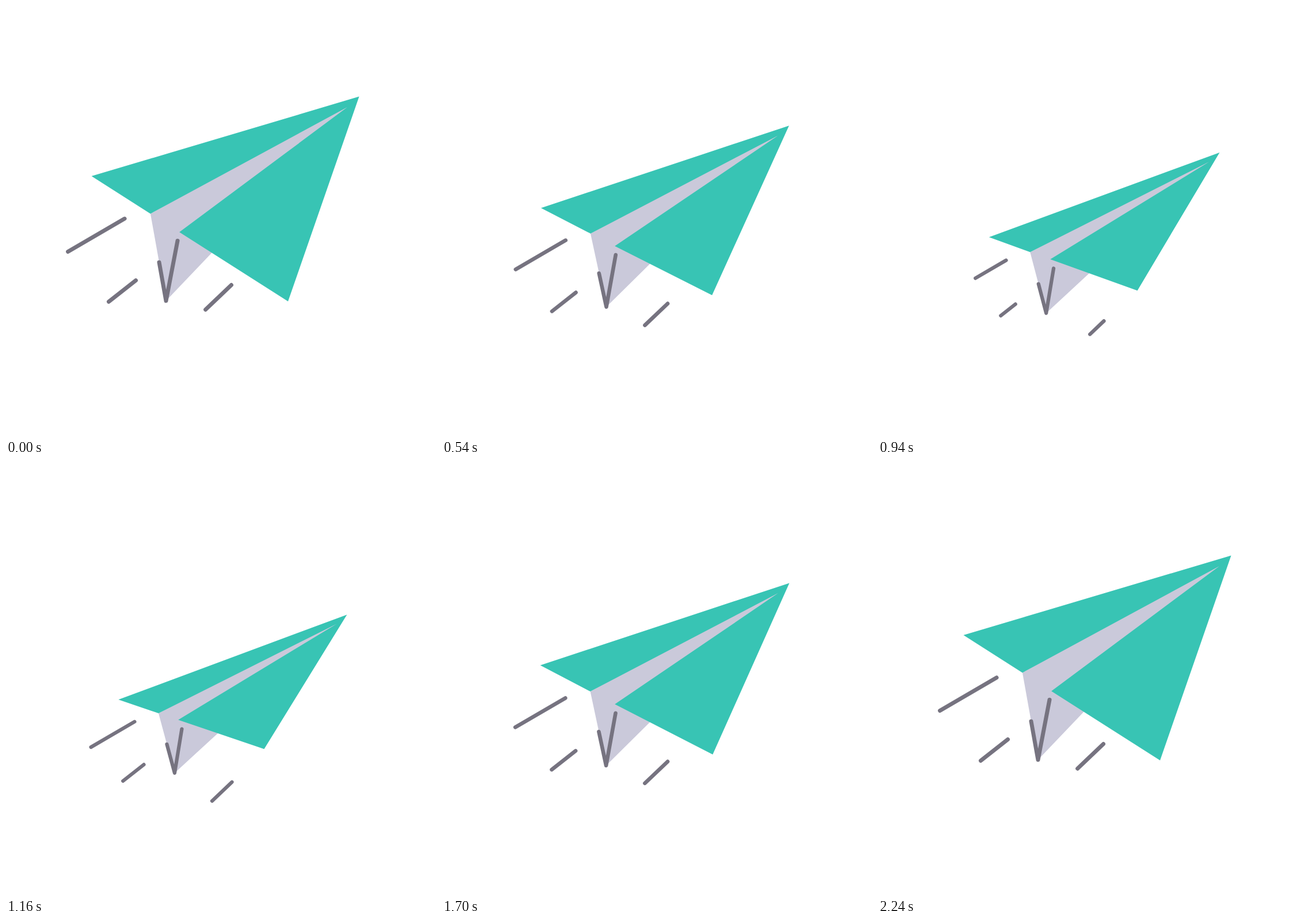
Write an HTML page that moves like this. It is 747x750 px and loops after 2260 ms.

```html
<!DOCTYPE html>
<html lang="en">
<head>
<meta charset="utf-8">
<title>Paper plane</title>
<style>
  html, body { margin: 0; width: 100%; height: 100%; overflow: hidden; background: #fff; }
  svg { display: block; width: 100%; height: 100%; }
</style>
</head>
<body>
<svg viewBox="0 0 747 750">
  <g id="plane">
    <polygon id="keel" fill="#cac9da"/>
    <polygon id="wings" fill="#38c4b4"/>
    <path id="strokes" fill="none" stroke="#767380" stroke-linecap="round" stroke-linejoin="round"/>
  </g>
</svg>
<script>
const LOOP = 2260, STEP = 20, HALF = 1120, PULSE = 280, SHORTEST = 0.415;

const el = id => document.getElementById(id);
const mix = (a, b, k) => a + (b - a) * k;
const between = (a, b, k) => [mix(a[0], b[0], k), mix(a[1], b[1], k)];
const polar = ([x, y], len, deg) => {
  const a = deg * Math.PI / 180;
  return [x + len * Math.cos(a), y + len * Math.sin(a)];
};
const ease = s => s * s * (3 - 2 * s);
const clamp = s => Math.min(1, Math.max(0, s));

// Crease, notch and keel all meet the straight rear edge at a share of its length.
function plane({ tip, left, right, foot, top, shares, bare, size }) {
  const [crease, notch, vent] = shares.map(k => between(left, right, k));
  const slit = polar(tip, 27.6 * size, 138);
  return {
    wings: [tip, left, crease, slit, notch, right],
    keel: [tip, crease, foot, vent],
    fold: [between(crease, foot, bare), foot, top]
  };
}

const raised = plane({
  tip: [613.5, 157.5], left: [148.5, 296], right: [490, 514],
  foot: [278, 513], top: [298, 408.5],
  shares: [0.3, 0.447, 0.612], bare: 0.558, size: 1
});
const lowered = plane({
  tip: [592.2, 260.8], left: [195.5, 408.7], right: [448.3, 494.3],
  foot: [293, 536], top: [305.5, 459.5],
  shares: [0.275, 0.41, 0.682], bare: 0.518, size: 0.87
});

const trails = [
  { from: [206, 370], to: [223.5, 447], len: 114, tilt: 149.7 },
  { from: [225.5, 477.5], to: [239.5, 521.5], len: 59.8, tilt: 141.8 },
  { from: [391.5, 485.5], to: [392.5, 552], len: 61.9, tilt: 136.4 }
];

const text = pts => pts.map(p => p.map(v => v.toFixed(2)).join()).join(" ");

function draw(ms) {
  const t = Math.min(Math.floor(ms % LOOP / STEP) * STEP, 2 * HALF);
  const drop = t < HALF
    ? ease(clamp((t + STEP) / HALF))
    : 1 - ease(clamp((t - HALF) / HALF));

  // Trails shrink and grow at a steady rate.
  const swing = Math.abs(t % PULSE / PULSE * 2 - 1);
  const reach = mix(SHORTEST, 1, swing) * mix(1, 0.925, drop);

  const pose = part => raised[part].map((p, i) => between(p, lowered[part][i], drop));
  const lines = trails.map(({ from, to, len, tilt }) => {
    const head = between(from, to, drop);
    return [head, polar(head, len * reach, tilt)];
  });

  el("wings").setAttribute("points", text(pose("wings")));
  el("keel").setAttribute("points", text(pose("keel")));
  el("strokes").setAttribute("d", [pose("fold"), ...lines].map(l => "M" + text(l)).join(""));
  el("strokes").setAttribute("stroke-width", mix(7, 6.2, drop));

  // The path bows slightly upward between the two poses.
  el("plane").setAttribute("transform", `translate(0 ${-3.6 * drop * (1 - drop)})`);
}

const start = performance.now();
function tick() {
  draw(performance.now() - start);
  requestAnimationFrame(tick);
}
tick();
</script>
</body>
</html>
```
